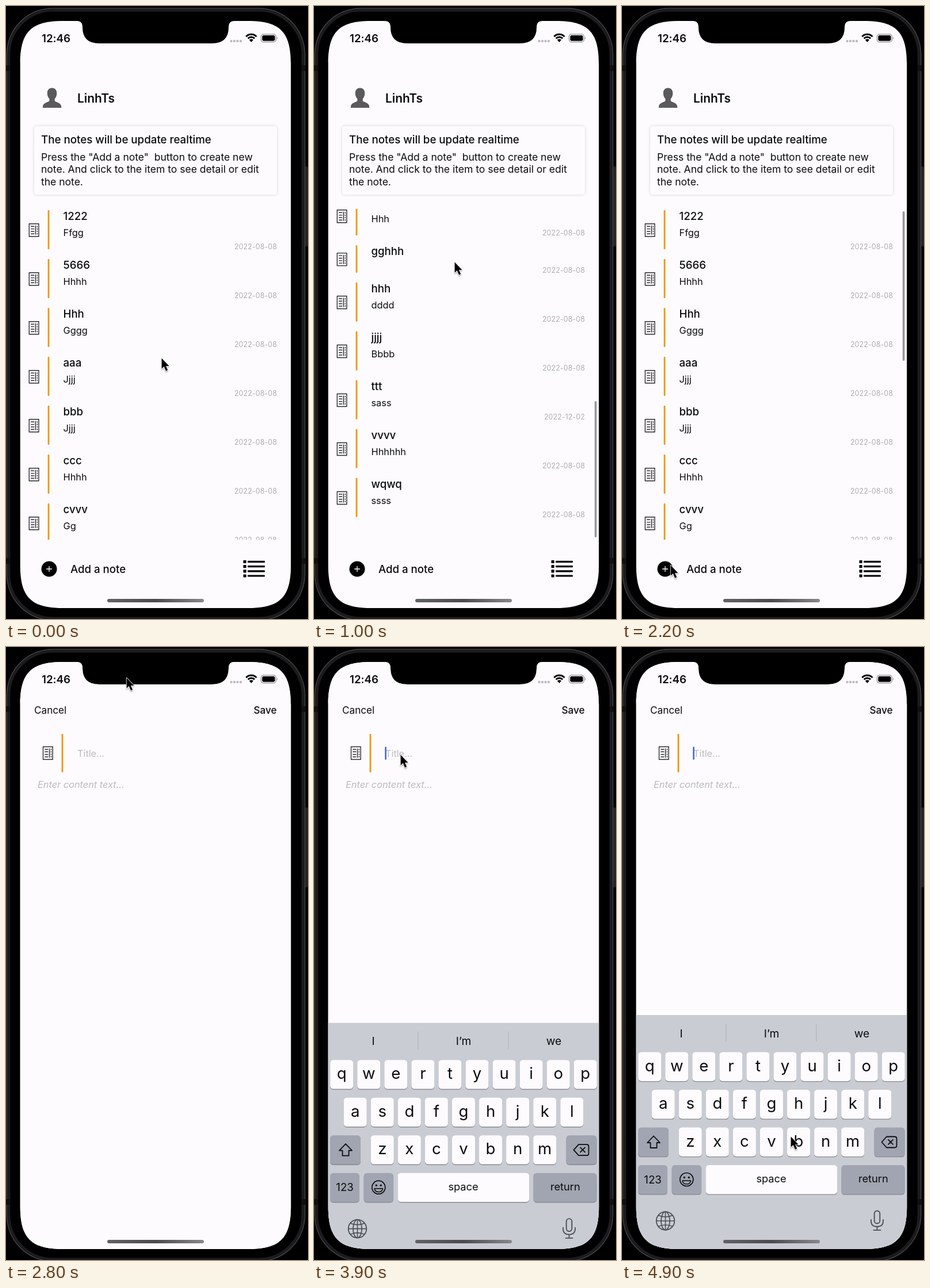
An HTML page for the animation above (5 s loop, 525 px wide and 1066 px high).

```html
<!DOCTYPE html>
<html lang="en">
<head>
<meta charset="utf-8">
<title>Notes app</title>
<style>
  html, body { margin: 0; width: 100%; height: 100%; overflow: hidden; background: #000; }
  svg { display: block; width: 100vw; height: 100vh; }
  text { font-family: Inter, Roboto, sans-serif; letter-spacing: -.002em; fill: #0b0b0d; }
  .line { fill: none; stroke-linecap: round; stroke-linejoin: round; }
</style>
</head>
<body>
<svg id="stage" viewBox="0 0 525 1066" preserveAspectRatio="none"></svg>
<script>
const PAPER = '#fdfbfe', INK = '#0b0b0d', ORANGE = '#f2960f', HINT = '#bcbbbf';
const LOOP = 5000, STEP = 100;
const LIST_TOP = 355, LIST_END = 681, CLIP_TOP = 353, CLIP_BOTTOM = 928;

// title, body, date (default when absent)
const notes = [
  ['1222', 'Ffgg'], ['5666', 'Hhhh'], ['Hhh', 'Gggg'], ['aaa', 'Jjjj'], ['bbb', 'Jjjj'],
  ['ccc', 'Hhhh'], ['cvvv', 'Gg'], ['ddd', 'Ggg'], ['fff', 'Hhh'], ['gghhh', ''],
  ['hhh', 'dddd'], ['jjjj', 'Bbbb'], ['ttt', 'sass', '2022-12-02'], ['vvvv', 'Hhhhhh'], ['wqwq', 'ssss']
];

// resting points [ms, value...], eased in between
const pointerStops = [
  [0, 270, 611], [500, 258, 745], [1000, 244, 444], [1500, 239, 766], [2000, 84, 971],
  [2300, 84, 971], [2800, 209, 52], [3100, 104, 160], [3600, 150, 186], [4200, 150, 186],
  [4500, 285, 690], [4800, 66, 905], [4900, 293, 850]
];
const scrollStops = [[600, 0], [1000, 704], [1200, LIST_END], [1500, -53.5], [1900, 0]];
const sheetStops = [[2200, 1050], [2470, 0]];

const rect = (x, y, w, h, fill, r = 0) =>
  `<rect x="${x}" y="${y}" width="${w}" height="${h}" rx="${r}" fill="${fill}"/>`;
const outline = (x, y, w, h, r, color, width) =>
  `<rect x="${x}" y="${y}" width="${w}" height="${h}" rx="${r}" fill="none" stroke="${color}" stroke-width="${width}"/>`;
const oval = (x, y, rx, ry, color, width) =>
  `<ellipse cx="${x}" cy="${y}" rx="${rx}" ry="${ry}" fill="none" stroke="${color}" stroke-width="${width}"/>`;
const dot = (x, y, r, fill) => `<circle cx="${x}" cy="${y}" r="${r}" fill="${fill}"/>`;
const text = (x, y, size, s, extra = '') =>
  `<text x="${x}" y="${y}" font-size="${size}" ${extra}>${s}</text>`;
const line = (d, color, w) => `<path class="line" d="${d}" stroke="${color}" stroke-width="${w}"/>`;
const repeat = (n, draw) => Array.from({ length: n }, (_, i) => draw(i)).join('');
const MEDIUM = 'font-weight="500"', BOLD = 'font-weight="600"';
const MIDDLE = 'text-anchor="middle"', END = 'text-anchor="end"';

function noteIcon(cx, cy) {
  return `<g transform="translate(${cx} ${cy})" fill="none" stroke="#2a2a2c" stroke-width="1.4">
    <path d="M-8.3-11h16.6v22h-16.6zM-5.5-6.5h6M-5.5-2.2h6M-5.5 2.2h6M-5.5 6.5h6M2.7-8v16"/>
    <path d="M5.6-7.5v15" stroke-dasharray="2.4 1.8"/></g>`;
}

function noteList() {
  let y = LIST_TOP;
  return notes.map(([title, body, date = '2022-08-08']) => {
    const h = body ? 68 : 47.7;
    const row = rect(72.6, y, 2.8, h, ORANGE, 1) + noteIcon(48.6, y + h / 2 + .8) +
      text(99.5, y + 17, 18.7, title, MEDIUM) + text(99.5, y + 45, 16.4, body) +
      text(471, y + h + .3, 12.4, date, END + ' style="fill:#aeadb1;letter-spacing:.01em"');
    y += h + 17;
    return row;
  }).join('');
}

function homePage() {
  const intro = ['Press the "Add a note"&#160; button to create new',
    'note. And click to the item to see detail or edit', 'the note.'];
  const bullets = repeat(4, i => {
    const y = 966.4 + i * 8.2;
    return rect(412.5, y - 2.6, 5.2, 5.2, '#000', 1) + rect(420, y - 1.6, 30, 3.2, '#000', 1);
  });
  return `<path fill="#5a595c" d="M80 142.5c5.6 0 8.3 4 8.3 9.2 0 4-1.5 7.4-3.6 9.7v3.6c1 2.3 11.4 3.2 11.4 9.5v2.5H64v-2.5
      c0-6.3 10.4-7.2 11.4-9.5v-3.6c-2.2-2.3-3.7-5.7-3.7-9.7 0-5.2 2.7-9.2 8.3-9.2z"/>` +
    text(124, 168, 20.9, 'LinhTs', BOLD) +
    `<g filter="url(#soft)">${rect(49, 209, 422, 119, PAPER, 5)}</g>` +
    text(61, 239, 18.8, 'The notes will be update realtime', MEDIUM) +
    intro.map((s, i) => text(61, 268.7 + i * 21.7, 17.6, s)).join('') +
    `<g clip-path="url(#listClip)"><g id="list">${noteList()}</g></g>
     <rect id="thumb" x="487.8" width="3.6" rx="1.8" fill="#99989c"/>` +
    dot(75, 979, 13.5, '#000') + line('M70.5 979h9M75 974.5v9', '#fff', 1.3) +
    text(112, 985.8, 18.7, 'Add a note', MEDIUM) + bullets;
}

function editPage() {
  const hint = `style="fill:${HINT}"`;
  return rect(20, 26, 480, 1030, PAPER) +
    text(49, 116, 17.2, 'Cancel') + text(470.5, 116, 17.2, 'Save', MEDIUM + END) +
    rect(96.6, 151, 2.8, 67, ORANGE, 1) + noteIcon(72.8, 184.5) +
    text(124, 190.5, 16.3, 'Title...', hint) +
    text(55, 245, 16.4, 'Enter content text...', 'font-style="italic" ' + hint) +
    `<g id="caret">${rect(123.3, 173.5, 2.6, 22.5, '#4567d6', 1)}</g>`;
}

const key = (x, y, w, fill = PAPER) =>
  rect(x, y + 1.4, w, 50.4, '#888b92', 5.5) + rect(x, y, w, 50.4, fill, 5.5);

function keyboard() {
  const GREY = '#a0a5b1', DIM = '#4b4e54', PITCH = 47.07, ROW = 65.5, TOP = 704.5;
  const letters = ['qwertyuiop', 'asdfghjkl', 'zxcvbnm'].map((row, r) =>
    [...row].map((c, i) => {
      const x = 260 + (i - row.length / 2) * PITCH + 3.5, y = TOP + r * ROW;
      return key(x, y, 40) + text(x + 20, y + 33, 27.6, c, MIDDLE);
    }).join('')).join('');
  const words = ['I', 'I’m', 'we'].map((s, i) => text(103 + i * 157, 678.7, 19.2, s, MIDDLE)).join('');
  const y3 = TOP + 2 * ROW, y4 = TOP + 3 * ROW;
  return rect(20, 640, 480, 430, '#c9ccd3') + words + letters +
    repeat(2, i => rect(180.2 + i * 157, 656, 1.3, 30, '#b3b7be')) +
    key(28, y3, 53, GREY) + key(438.5, y3, 53, GREY) +
    line('M55 850.5l11 11.5h-5.5v9h-11v-9h-5.5z', INK, 1.8) +
    line('M460 851.5h14q3.5 0 3.5 3.5v12q0 3.5-3.5 3.5h-14l-8.5-9.5zM463 856.8l8 8M471 856.8l-8 8', INK, 1.8) +
    key(28, y4, 51, GREY) + key(86.6, y4, 51.5, GREY) + key(145.6, y4, 228.6) + key(381.5, y4, 110, GREY) +
    text(53.5, 932.5, 18.6, '123', MIDDLE) + text(259.5, 931.3, 18.3, 'space', MIDDLE) +
    text(436.8, 931.3, 18.3, 'return', MIDDLE) +
    oval(112.3, 926, 11.5, 11.5, INK, 1.7) + dot(108.3, 922.5, 1.7, INK) + dot(116.3, 922.5, 1.7, INK) +
    line('M105 928h14.6q-1 6-7.3 6t-7.3-6z', INK, 1.5) +
    oval(75.5, 998, 15.8, 15.8, DIM, 1.8) + oval(75.5, 998, 7.5, 15.8, DIM, 1.7) +
    line('M75.5 982v32M60 998h31M63.5 988.5q12 5 24 0M63.5 1007.5q12-5 24 0', DIM, 1.6) +
    outline(438.7, 980.5, 9.6, 22, 4.8, DIM, 1.9) +
    line('M433 996v2q0 10 10.5 10t10.5-10v-2M443.5 1008v6M437.5 1014.2h12', DIM, 1.8);
}

function statusBar() {
  const arc = r => `<path d="M${426.4 - r * .72} ${62 - r * .7}a${r} ${r} 0 0 1 ${r * 1.44} 0"/>`;
  return text(62, 63, 18.8, '12:46', BOLD) +
    repeat(4, i => dot(391.5 + i * 5.5, 61, 2.2, '#bdbbc0')) +
    `<g fill="none" stroke="#000" stroke-width="3">${arc(12.6)}${arc(7.9)}</g>
     <path d="M426.4 63l-3.6-4.2q3.600-2.8 7.2 0z"/>` +
    outline(443.4, 49.2, 26, 13.4, 4, '#8b8a8e', 1.2) + rect(445.3, 51.1, 22.2, 9.6, '#000', 2.4) +
    '<path d="M471 53.5q2.4 2.300 0 4.8z" fill="#8b8a8e"/>';
}

function phone() {
  return rect(519, 279, 6, 139, '#232225', 2) +
    outline(1.5, 4, 518, 1064, 80, '#454447', 1.6) + outline(4.8, 7.3, 511.4, 1057.4, 77, '#1c1b1d', 5) +
    repeat(4, i => rect(i % 2 * 514, i < 2 ? 103 : 960, 7, 10, '#101011'));
}

// rounded screen with soft corners and the notch cut from its top edge
function screenPath() {
  const l = 24.7, r = 495.2, t = 26, b = 1047, s = 74, c = 19;
  return `M${l + s} ${t}H123Q133 ${t} 133 37Q133 65 162 65H358Q387 65 387 37Q387 ${t} 397 ${t}H${r - s}
    C${r - c} ${t} ${r} ${t + c} ${r} ${t + s}V${b - s}C${r} ${b - c} ${r - c} ${b} ${r - s} ${b}
    H${l + s}C${l + c} ${b} ${l} ${b - c} ${l} ${b - s}V${t + s}C${l} ${t + c} ${l + c} ${t} ${l + s} ${t}Z`;
}

document.getElementById('stage').innerHTML = `
  <defs>
    <clipPath id="screenClip"><path d="${screenPath()}"/></clipPath>
    <clipPath id="listClip">${rect(25, CLIP_TOP, 470, CLIP_BOTTOM - CLIP_TOP, '#000')}</clipPath>
    <filter id="soft" x="-5%" y="-10%" width="110%" height="120%">
      <feDropShadow dx="0" dy="0" stdDeviation="2.6" flood-color="#000" flood-opacity=".16"/></filter>
    <filter id="drop" x="-50%" y="-50%" width="200%" height="200%">
      <feDropShadow dx="0" dy="1.5" stdDeviation="1.3" flood-color="#000" flood-opacity=".4"/></filter>
    <linearGradient id="bar"><stop offset="0" stop-color="#626165"/>
      <stop offset=".5" stop-color="#4b4a4e"/><stop offset="1" stop-color="#88878b"/></linearGradient>
  </defs>
  ${phone()}
  <g clip-path="url(#screenClip)">
    ${rect(20, 20, 480, 1040, PAPER)}
    ${homePage()}
    <g id="sheet">${editPage()}</g>
    <g id="board">${keyboard()}</g>
    ${statusBar()}
    ${rect(176, 1031, 168, 6, 'url(#bar)', 3)}
  </g>
  <g id="pointer" filter="url(#drop)">
    <path transform="translate(.6 1.4) scale(.9)" d="M0 0V20.5L4.6 16.3L8.3 24.8L11.8 23.3L8.2 15H14.3Z"
      stroke="#fff" stroke-width="1.6" stroke-linejoin="round" paint-order="stroke"/>
  </g>`;

const [list, thumb, sheet, caret, board, pointer] =
  ['list', 'thumb', 'sheet', 'caret', 'board', 'pointer'].map(id => document.getElementById(id));

const smooth = p => p * p * (3 - 2 * p);

function at(stops, t) {
  const next = stops.findIndex(s => s[0] > t);
  if (next < 0) return stops[stops.length - 1].slice(1);
  const b = stops[next], a = stops[next - 1] || b;
  const p = a === b ? 0 : smooth((t - a[0]) / (b[0] - a[0]));
  return a.slice(1).map((v, i) => v + (b[i + 1] - v) * p);
}

const move = (el, x, y) => el.setAttribute('transform', `translate(${x} ${y})`);
const show = (el, on) => el.setAttribute('visibility', on ? 'visible' : 'hidden');

function draw(t) {
  const [scroll] = at(scrollStops, t);
  const inside = Math.min(Math.max(scroll, 0), LIST_END);
  const over = Math.abs(scroll - inside);
  move(list, 0, -scroll);
  // the thumb shrinks against the edge while the list is pulled past its end
  thumb.setAttribute('height', 260 - over);
  thumb.setAttribute('y', 357 + inside / LIST_END * 307 + (scroll > LIST_END ? over : 0));
  show(thumb, t > 600);

  move(sheet, 0, at(sheetStops, t)[0]);
  show(caret, t >= 3700);
  move(board, 0, 430 * Math.exp(-Math.max(0, t - 3600) / 87));
  move(pointer, ...at(pointerStops, t));
}

const start = performance.now();
function tick() {
  const t = (performance.now() - start) % LOOP;
  draw(Math.floor(t / STEP) * STEP);
  requestAnimationFrame(tick);
}
tick();
</script>
</body>
</html>
```
